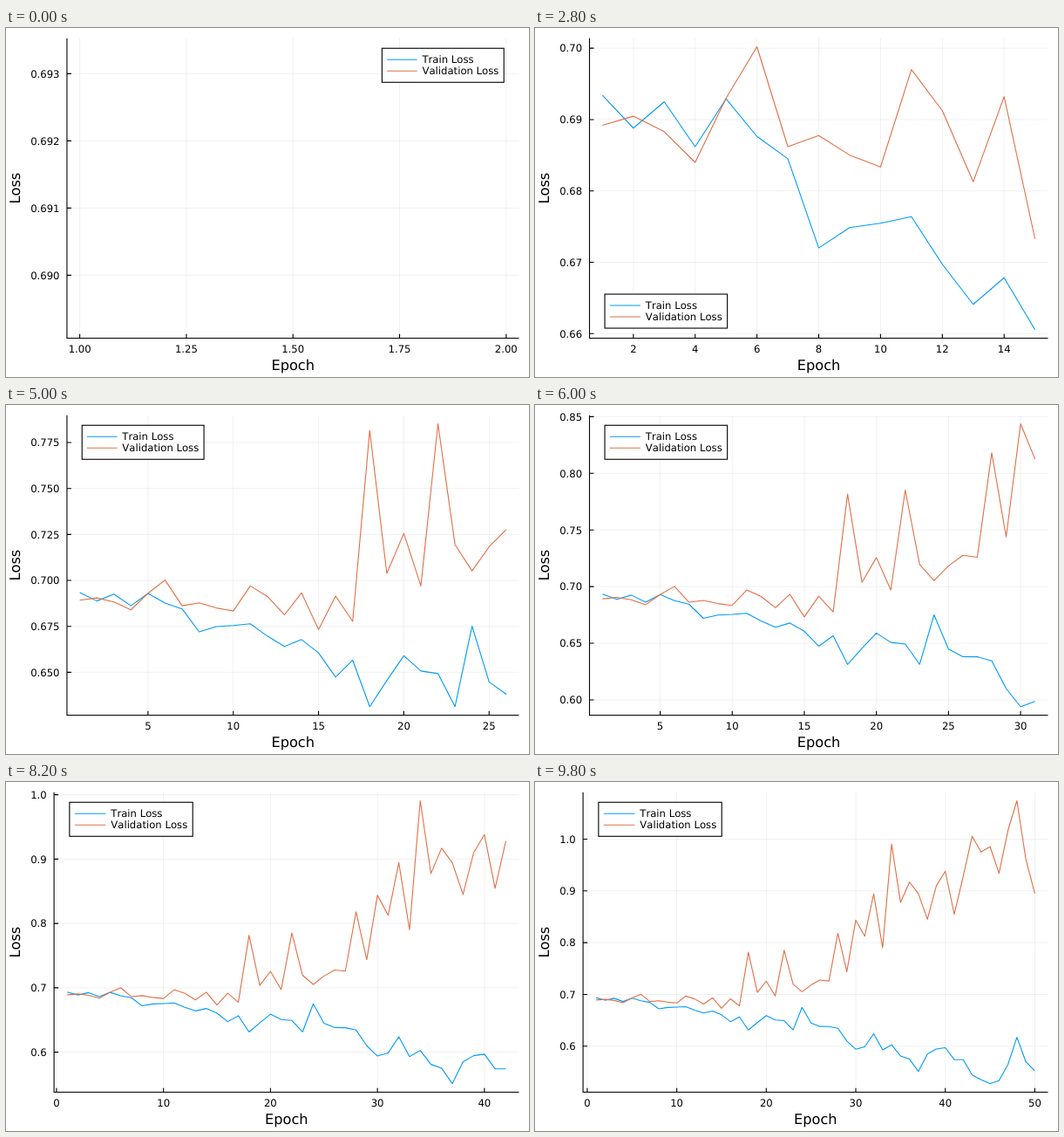
Write an HTML page that moves like this. It is 600x400 px and loops after 10 s.

```html
<!DOCTYPE html>
<html lang="en">
<head>
<meta charset="utf-8">
<title>Loss per epoch</title>
<style>
  html, body { margin: 0; width: 100%; height: 100%; overflow: hidden; background: #fff; }
  svg { display: block; width: 600px; height: 400px; }
  text {
    font: 11.67px "DejaVu Sans", sans-serif;
    font-kerning: none;
    text-rendering: geometricPrecision;
  }
  .guide { font-size: 16.2px; }
  .mid { text-anchor: middle; }
  .end { text-anchor: end; }
  path, rect { fill: none; stroke: #000; stroke-width: 1.1; }
  .grid { stroke-opacity: .1; stroke-width: .6; }
  .train { stroke: #009afa; stroke-linejoin: round; }
  .val { stroke: #e26f46; stroke-linejoin: round; }
  rect { fill: #fff; }
</style>
</head>
<body>
<svg id="chart" viewBox="0 0 600 400"></svg>
<script>
const train = [
  .6934, .6888, .6925, .6862, .6929, .68764, .6845, .672, .67486, .67547,
  .67639, .66972, .6641, .66783, .66055, .6474, .6566, .6313, .6455, .659,
  .6507, .6493, .6314, .6751, .6448, .6381, .638, .6345, .61, .594,
  .5987, .624, .593, .6027, .581, .575, .551, .585, .5946, .597,
  .574, .574, .5445, .535, .5275, .5334, .5646, .617, .5697, .552];
const val = [
  .68919, .69047, .6883, .684, .693, .7002, .6862, .68777, .68502, .68336,
  .697, .69125, .68128, .69321, .67327, .6915, .6777, .7816, .7038, .7256,
  .697, .7852, .7195, .7052, .7183, .7276, .7259, .818, .7438, .8437,
  .8126, .8945, .79, .9906, .8776, .9169, .8943, .845, .91, .938,
  .8546, .928, 1.0056, .975, .9857, .934, 1.0168, 1.0741, .961, .8947];

const STEP_MS = 200;
const TOP = 11.8, BOTTOM = 355.5, RIGHT = 588.5;
const LEGEND_TEXT = 88, LEGEND_ROW = 13;
const EPS = 1e-9;
const chart = document.getElementById('chart');

const widen = (lo, hi) => [lo - .03 * (hi - lo), hi + .03 * (hi - lo)];
const path = (cls, d) => `<path class="${cls}" d="${d}"/>`;
const text = (cls, x, y, s) => `<text class="${cls}" x="${x}" y="${y}">${s}</text>`;

// Picks round tick values by scoring count, coverage, niceness and zero.
function pickTicks([lo, hi]) {
  const steps = [[1, 1], [5, .9], [2, .7], [2.5, .5], [3, .2]];
  const span = hi - lo, minCount = 4, maxCount = 8, ideal = 5;
  let best = -Infinity, ticks = [];
  for (let z = Math.ceil(Math.log10(span)); 2 * maxCount * 10 ** (z + 1) > span; z--) {
    for (let k = minCount; k <= 2 * maxCount; k++) {
      for (const [q, nice] of steps) {
        const step = q * 10 ** z, reach = (k - 1) * step;
        for (let r = Math.ceil((hi - reach) / step); r * step <= lo; r++) {
          const inside = Array.from({ length: k }, (_, i) => (r + i) * step)
            .filter(v => v >= lo - EPS && v <= hi + EPS);
          const count = inside.length;
          if (count < minCount || count > maxCount) continue;
          const score = (1 - Math.abs(count - ideal) / ideal) / 4
            + (r <= 0 && -r < k ? 1 / 6 : 0)
            + .5 * span / ((count - 1) * step)
            + nice / 4
            - (reach >= 2 * span ? 1000 : 0);
          if (score > best + EPS) [best, ticks] = [score, inside];
        }
      }
    }
  }
  return ticks;
}

function decimals(ticks) {
  let d = 0;
  while (ticks.some(v => Math.abs(v - v.toFixed(d)) > 1e-7)) d++;
  return d;
}

// The emptiest corner wins; ties prefer the top, then the right.
function pickCorner(points) {
  const corners = [[1, 1], [0, 1], [1, 0], [0, 0]];
  const use = corners.map(([cx, cy]) => points.reduce((sum, [x, y]) => {
    const dx = Math.abs(x - cx), dy = Math.abs(y - cy);
    return dx > .25 || dy > .25 ? sum : sum + 1 / (1 + 100 * (dx * dx + dy * dy));
  }, 0));
  return corners[use.indexOf(Math.min(...use))];
}

function legend([cx, cy], left) {
  const w = RIGHT - left, pad = w / 90, inset = w / 30, drop = (BOTTOM - TOP) / 30;
  const width = LEGEND_TEXT + 9 * pad, height = 3 * LEGEND_ROW;
  const x = cx ? RIGHT - inset - width : left + inset;
  const y = cy ? TOP + drop : BOTTOM - drop - height;
  const row = (i, cls, label) => {
    const mid = y + i * LEGEND_ROW;
    return path(cls, `M${x + pad} ${mid}h${6 * pad}`) + text('', x + 8 * pad, mid + 4.2, label);
  };
  return `<rect x="${x}" y="${y}" width="${width}" height="${height}"/>`
    + row(1, 'train', 'Train Loss') + row(2, 'val', 'Validation Loss');
}

function draw(n) {
  const a = train.slice(0, n), b = val.slice(0, n), all = [...a, ...b];
  const xLim = widen(1, Math.max(n, 2));
  const yLim = widen(Math.min(...all), Math.max(...all));
  const xTicks = pickTicks(xLim), yTicks = pickTicks(yLim);
  const xDigits = decimals(xTicks), yDigits = decimals(yTicks);
  const left = 55.1 + 7.42 * (yDigits - 1);

  const fx = x => (x - xLim[0]) / (xLim[1] - xLim[0]);
  const fy = y => (y - yLim[0]) / (yLim[1] - yLim[0]);
  const px = x => left + fx(x) * (RIGHT - left);
  const py = y => BOTTOM - fy(y) * (BOTTOM - TOP);
  const line = ys => 'M' + ys.map((y, i) => `${px(i + 1).toFixed(2)} ${py(y).toFixed(2)}`).join('L');
  const spots = ys => ys.map((y, i) => [fx(i + 1), fy(y)]);

  let grid = '', axes = `M${left} ${TOP}V${BOTTOM}H${RIGHT}`, labels = '';
  for (const v of xTicks) {
    const x = px(v);
    grid += `M${x} ${TOP}V${BOTTOM}`;
    axes += `M${x} ${BOTTOM}v-4.8`;
    labels += text('mid', x, 371.6, v.toFixed(xDigits));
  }
  for (const v of yTicks) {
    const y = py(v);
    grid += `M${left} ${y}H${RIGHT}`;
    axes += `M${left} ${y}h5`;
    labels += text('end', left - 8.4, y + 4.3, v.toFixed(yDigits));
  }

  chart.innerHTML = path('grid', grid) + path('axes', axes) + labels
    + text('guide mid', (left + RIGHT) / 2, 392, 'Epoch')
    + `<g transform="translate(16.3 ${(TOP + BOTTOM) / 2}) rotate(-90)">${text('guide mid', 0, 0, 'Loss')}</g>`
    + path('train', line(a)) + path('val', line(b))
    + legend(pickCorner([...spots(a), ...spots(b)]), left);
}

let shown = 0;
function tick() {
  const n = Math.floor(performance.now() / STEP_MS) % train.length + 1;
  if (n !== shown) draw(shown = n);
  requestAnimationFrame(tick);
}
tick();
</script>
</body>
</html>
```
